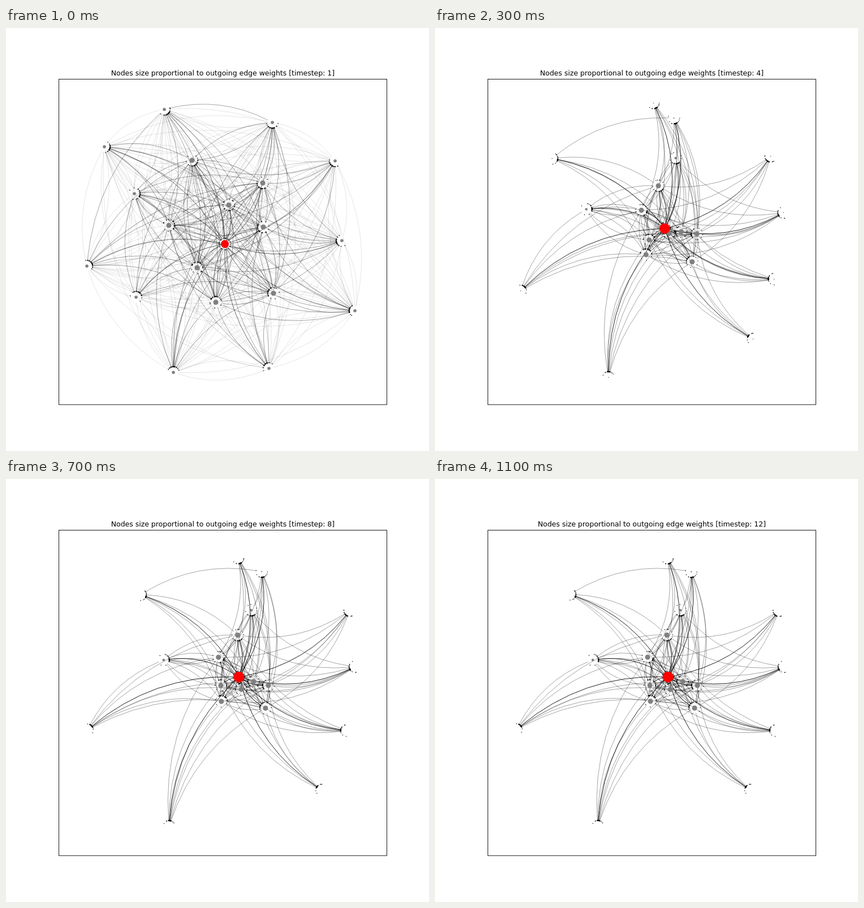
These frames come from a looping animation (748 by 748 pixels, 1200 ms). An HTML page with a canvas:

```html
<!DOCTYPE html>
<html lang="en">
<head>
<meta charset="utf-8">
<title>Network over time</title>
<style>
  html, body { margin: 0; width: 100%; height: 100%; overflow: hidden; background: #fff; }
  canvas { display: block; }
</style>
</head>
<body>
<canvas id="stage" width="748" height="748"></canvas>
<script>
const ctx = document.getElementById('stage').getContext('2d');
const STEP_MS = 100, STEPS = 12;
const GAP = 9;            // distance kept between an edge and a node centre
const BEND = 0.2;         // sideways bow of an edge, relative to its length
const CENTRE = [383, 378];
const COUNT = 20, LEADER = 19, FIRST_HUB = 11;

// Key layouts as x y pairs: 11 rim nodes, 8 hubs, then the leader.
const layout = text => text.trim().split(/\s*,\s*/).map(pair => pair.split(' ').map(Number));
const scattered = layout(`
  174 210, 280 144, 471 167, 582 235, 594 376, 143 421, 617 500, 465 602, 296 609, 230 476, 227 293,
  329 234, 288 349, 394 313, 454 274, 455 352, 371 485, 338 424, 473 469, 387 382`);
const gathering = layout(`
  243 140, 276 201, 381 227, 519 212, 610 297, 143 442, 587 439, 586 549, 403 615, 221 562, 206 339,
  316 295, 307 361, 422 372, 404 317, 459 358, 372 426, 332 442, 432 458, 376 378`);
const settled = layout(`
  411 140, 453 164, 434 232, 608 233, 617 332, 239 204, 602 445, 558 550, 288 614, 144 443, 279 320,
  410 276, 376 315, 438 358, 416 372, 464 365, 380 365, 381 393, 459 405, 412 350`);

// Lasting links: three rim nodes keep a few, hubs keep most, the leader keeps all.
const rimLinks = { 1: [5], 2: [1, 4, 11, 17], 10: [9, 12, 16, 17] };
const links = settled.map((_, i) => {
  if (i < FIRST_HUB) return rimLinks[i] || [];
  const kept = i === LEADER ? COUNT : 16;
  return [...Array(COUNT).keys()].filter(j => (i * 7 + j * 3 + 18) % COUNT < kept);
});

const mix = (a, b, k) => a + (b - a) * k;
const mixPoint = (p, q, k) => [mix(p[0], q[0], k), mix(p[1], q[1], k)];
const dist = (p, q) => Math.hypot(p[0] - q[0], p[1] - q[1]);

// Moves a point around the centre rather than straight through it.
function swing(p, q, k) {
  const angleOf = n => Math.atan2(n[1] - CENTRE[1], n[0] - CENTRE[0]);
  const a = angleOf(p), turn = angleOf(q) - a;
  const angle = a + k * Math.atan2(Math.sin(turn), Math.cos(turn));
  const radius = mix(dist(p, CENTRE), dist(q, CENTRE), k);
  return [CENTRE[0] + radius * Math.cos(angle), CENTRE[1] + radius * Math.sin(angle)];
}

// After the first jump the layout closes 60% of the remaining way in each step.
function poseAt(age) {
  if (age === 0) return scattered;
  const k = 1 - 0.4 ** (age - 1);
  return gathering.map((p, i) => (i < FIRST_HUB ? swing : mixPoint)(p, settled[i], k));
}

function radiusOf(i, age) {
  if (i === LEADER) return 9.6 - 2.6 * 0.5 ** age;
  return Math.max(2.8 * 0.68 ** age, Math.sqrt(1.3 * links[i].length));
}

function edgeWidth(i, j, age) {
  if (!links[i].includes(j)) return 0.11 * 0.42 ** age;
  return i === LEADER ? 0.88 - 0.3 * 0.5 ** age : 0.36;
}

function drawEdge(p, q, width) {
  const mid = mixPoint(p, q, 0.5);
  const c = [mid[0] - BEND * (q[1] - p[1]), mid[1] + BEND * (q[0] - p[0])];
  const at = (u, v) => mixPoint(mixPoint(p, c, u), mixPoint(c, q, u), v);
  const leave = (node, inside, outside) => {
    for (let n = 0; n < 14; n++) {
      const t = (inside + outside) / 2;
      if (dist(at(t, t), node) < GAP) inside = t; else outside = t;
    }
    return outside;
  };
  const t0 = leave(p, 0, 0.5), t1 = leave(q, 1, 0.5);
  const start = at(t0, t0), bend = at(t0, t1), tip = at(t1, t1);

  ctx.lineWidth = width;
  ctx.beginPath();
  ctx.moveTo(...start);
  ctx.quadraticCurveTo(...bend, ...tip);
  ctx.stroke();

  const len = dist(bend, tip) || 1;
  const ux = (tip[0] - bend[0]) / len, uy = (tip[1] - bend[1]) / len;
  const bx = tip[0] - ux * 1.8, by = tip[1] - uy * 1.8;
  ctx.beginPath();
  ctx.moveTo(...tip);
  ctx.lineTo(bx - uy * 0.9, by + ux * 0.9);
  ctx.lineTo(bx + uy * 0.9, by - ux * 0.9);
  ctx.closePath();
  ctx.fill();
  ctx.stroke();
}

function draw(step) {
  const age = step - 1, pose = poseAt(age);
  ctx.fillStyle = '#fff';
  ctx.fillRect(0, 0, 748, 748);

  ctx.fillStyle = ctx.strokeStyle = '#000';
  pose.forEach((p, i) => pose.forEach((q, j) => {
    if (i !== j) drawEdge(p, q, edgeWidth(i, j, age));
  }));

  pose.forEach((p, i) => {
    ctx.fillStyle = i === LEADER ? '#f00' : '#808080';
    ctx.beginPath();
    ctx.arc(...p, radiusOf(i, age), 0, Math.PI * 2);
    ctx.fill();
  });

  ctx.lineWidth = 0.9;
  ctx.strokeRect(93.5, 90.5, 580, 575.5);
  ctx.fillStyle = '#000';
  ctx.font = '12.47px "DejaVu Sans", sans-serif';
  ctx.textAlign = 'center';
  ctx.fillText(`Nodes size proportional to outgoing edge weights [timestep: ${step}]`, 383.4, 84);
}

const begin = performance.now();
let shown = 0;
function tick() {
  const step = Math.floor((performance.now() - begin) / STEP_MS) % STEPS + 1;
  if (step !== shown) draw(shown = step);
  requestAnimationFrame(tick);
}
tick();
</script>
</body>
</html>
```
